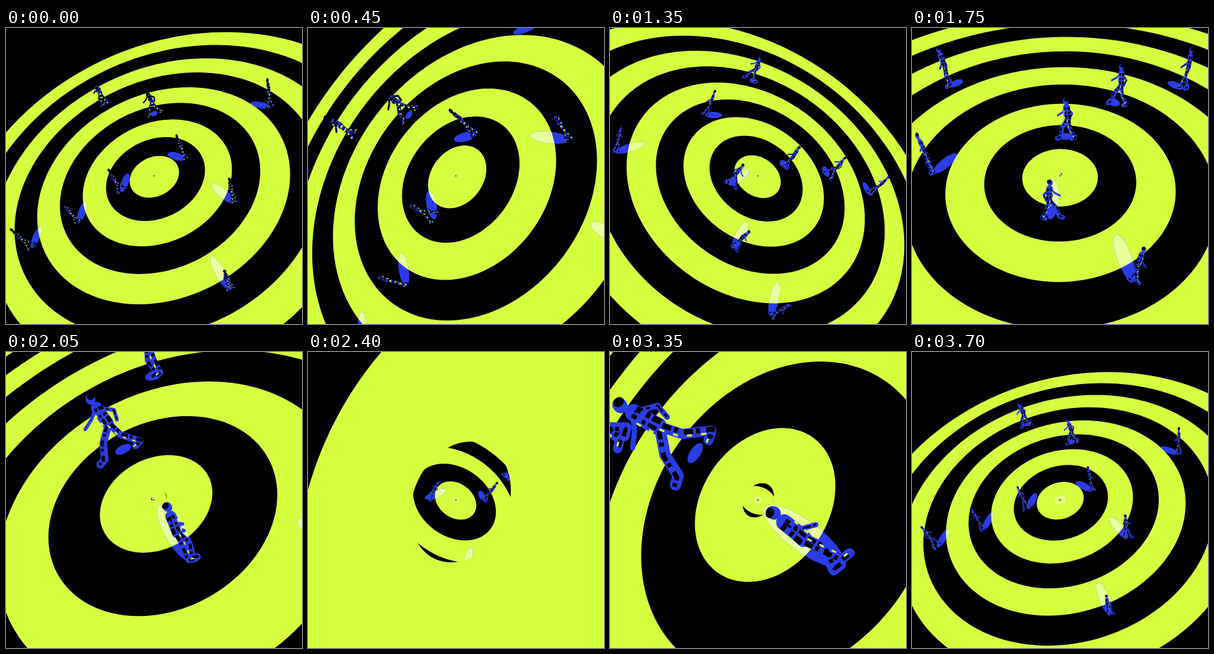
An HTML page with a canvas for the animation above (3.95 s loop, 480 px wide and 480 px high).

```html
<!DOCTYPE html>
<html>
<head>
<meta charset="utf-8">
<title>Walkers on endless rings</title>
<style>
html, body { margin: 0; width: 100%; height: 100%; overflow: hidden; background: #000; }
canvas { display: block; width: 480px; height: 480px; }
</style>
</head>
<body>
<canvas id="stage" width="480" height="480"></canvas>
<script>
const ctx = document.getElementById('stage').getContext('2d');
const YELLOW = '#d6ff40', BLUE = '#2a3ce6', PALE = '#e8ff9c', BLACK = '#000';
const LOOP = 3950, CYCLE = 66.5, REACH = 20.4, SPIN = -5.4;
const FOCUS = 630, TILT = 40.6 * Math.PI / 180;
const C = Math.cos(TILT), S = Math.sin(TILT);
const RINGS = 9, HOLE = 0.225, HEIGHT = 1.5, DEPTH = 4;
const rad = deg => deg * Math.PI / 180;

// start: step at which a layer begins; walk: first angle of each circle of people
const LAYERS = [
  { start: 0, roll: -26, walk: [89, 22.5, -6], dark: true },
  { start: 22.5, roll: 33.3, walk: [28, 46, 56] },
  { start: 44, roll: 20.4, walk: [39, 18.5, 9] }
];
const CIRCLES = [
  { r: 1.4, count: 2, rate: -2.65 },
  { r: 3.4, count: 3, rate: -1.85 },
  { r: 5.4, count: 4, rate: -1.1 }
];

// u runs away from the viewer, v to the right, h up from the plane
function makeView(s) {
  const k = s * S / FOCUS, kh = s * C / FOCUS;
  return {
    k,
    depth: (u, h) => 1 + k * u - kh * h,
    at(u, v, h = 0) {
      const d = this.depth(u, h);
      return [s * v / d, -s * (u * C + h * S) / d];
    }
  };
}

function addLine(points) {
  points.forEach(([x, y], i) => i ? ctx.lineTo(x, y) : ctx.moveTo(x, y));
}

function addCircle(view, r, u = 0, v = 0, ru = r) {
  const nearest = -0.97 / view.k, pts = [];
  for (let i = 0; i < 180; i++) {
    const a = i * Math.PI / 90;
    pts.push(view.at(Math.max(u + ru * Math.cos(a), nearest), v + r * Math.sin(a)));
  }
  addLine(pts);
  ctx.closePath();
}

function fillDisc(view, color, r) {
  ctx.beginPath();
  addCircle(view, r);
  ctx.fillStyle = color;
  ctx.fill();
}

function limb(color, width, points) {
  ctx.strokeStyle = color;
  ctx.lineWidth = width;
  ctx.beginPath();
  addLine(points);
  ctx.stroke();
}

function blob(color, x, y, rx, ry) {
  ctx.fillStyle = color;
  ctx.beginPath();
  ctx.ellipse(x, y, rx, ry, 0.2, 0, 7);
  ctx.fill();
}

function drawBody(w, dark) {
  const base = dark ? BLACK : BLUE, patch = dark ? BLUE : BLACK;
  const front = [[.01, .47], [.1 + .1 * w, .28], [.06 + .24 * w, .06], [.15 + .24 * w, .03]];
  const back = [[-.01, .47], [-.02 - .06 * w, .26], [-.08 - .2 * w, .05], [.01 - .2 * w, .02]];
  const armA = [[.02, .77], [-.12 * w - .05, .62], [.06 - .2 * w, .48]];
  const armB = [[.04, .78], [.12 * w + .06, .66], [.17 + .16 * w, .58]];
  const spine = [[0, .5], [.02, .64], [.03, .77]];
  const shift = (pts, dx) => pts.map(([x, y]) => [x + dx, y]);
  ctx.lineCap = ctx.lineJoin = 'round';
  limb(base, .055, armA);
  limb(base, .1, back);
  limb(base, .11, front);
  limb(base, .17, spine);
  limb(base, .05, armB);
  blob(base, .05, .92, .07, .08);
  blob(BLACK, .03, .95, .055, .045);

  // mottled light and dark
  ctx.lineCap = 'butt';
  ctx.setLineDash([.09, .03, .04, .06]);
  limb(patch, .05, shift(back, -.02));
  limb(patch, .045, shift(front, .02));
  limb(patch, .06, shift(spine, -.05));
  limb(patch, .04, shift(spine, .03));
  limb(patch, .02, armA);
  ctx.setLineDash([.05, .09]);
  limb(YELLOW, dark ? .04 : .02, shift(back, .03));
  limb(YELLOW, dark ? .035 : .02, shift(spine, .075));
  if (dark) limb(YELLOW, .03, shift(front, -.025));
  ctx.setLineDash([]);
}

// Shadow stretches inwards and away from the viewer
function drawShadow(view, p) {
  const du = .75 - .5 * p.u / p.r, dv = -.5 * p.v / p.r;
  const len = Math.hypot(du, dv), pts = [];
  for (let i = 0; i < 24; i++) {
    const a = i * Math.PI / 12;
    const along = .5 - .5 * Math.cos(a);
    const side = .17 * Math.sin(a) / len;
    pts.push(view.at(p.u + du * along - dv * side, p.v + dv * along + du * side));
  }
  const fill = color => {
    ctx.beginPath();
    addLine(pts);
    ctx.fillStyle = color;
    ctx.fill();
  };
  fill(BLUE);
  ctx.save();
  ctx.beginPath();
  addCircle(view, Math.floor(p.r));
  ctx.clip();
  fill(PALE);
  ctx.restore();
}

function drawPerson(view, p, step, dark) {
  const foot = view.at(p.u, p.v), head = view.at(p.u, p.v, HEIGHT);
  const dx = head[0] - foot[0], dy = head[1] - foot[1];
  const turn = -Math.cos(p.a);
  const face = (turn < 0 ? -1 : 1) * Math.max(.6, Math.abs(turn));
  ctx.save();
  ctx.transform(-dy * face, dx * face, dx, dy, foot[0], foot[1]);
  drawBody(Math.cos(step / 5 + p.id * 1.9 - 2.4), dark);
  ctx.restore();
}

function people(layer, step, view) {
  const list = [];
  CIRCLES.forEach((c, n) => {
    for (let i = 0; i < c.count; i++) {
      const a = rad(layer.walk[n] + c.rate * step + i * 360 / c.count);
      list.push({ a, r: c.r, u: c.r * Math.cos(a), v: c.r * Math.sin(a), id: n + i });
    }
  });
  return list.filter(p => view.depth(p.u, HEIGHT) > 0.15).sort((a, b) => b.u - a.u);
}

const layerStep = (frame, index) =>
  frame - LAYERS[index % 3].start - CYCLE * Math.floor(index / 3);

// Each layer covers the next one except for the hole in its middle
function drawLayer(frame, index, depth) {
  if (depth > 1) drawLayer(frame, index + 1, depth - 1);
  const step = layerStep(frame, index), layer = LAYERS[index % 3];
  const view = makeView(850 / (REACH - step));
  ctx.setTransform(1, 0, 0, 1, 240, 240);
  ctx.rotate(rad(layer.roll + SPIN * step));
  for (let n = RINGS + 1; n > 0; n--) {
    ctx.beginPath();
    if (n > RINGS) ctx.rect(-400, -400, 800, 800);
    else addCircle(view, n);
    if (depth > 1) addCircle(view, n > 1 ? 0.6 : HOLE);
    ctx.fillStyle = n % 2 ? YELLOW : BLACK;
    ctx.fill('evenodd');
  }
  if (layer.dark && step < 0) {
    fillDisc(view, PALE, HOLE);
    fillDisc(view, YELLOW, HOLE / 2);
  }
  const crowd = people(layer, step, view);
  crowd.forEach(p => drawShadow(view, p));
  crowd.forEach(p => drawPerson(view, p, step, layer.dark && step >= 0));
}

// Steps of 50 ms, every twelfth one a rest, with longer rests at both ends
function frameAt(ms) {
  const raw = Math.floor((Math.min(3700, Math.max(200, ms)) - 200) / 50);
  return raw - Math.floor(raw / 12);
}

let shown = -1;
function draw(ms) {
  const frame = frameAt(ms % LOOP);
  if (frame === shown) return;
  shown = frame;
  let first = 0;
  while (layerStep(frame, first) > 20) first++;
  drawLayer(frame, first, DEPTH);
  ctx.setTransform(1, 0, 0, 1, 0, 0);
  ctx.fillStyle = BLACK;
  ctx.fillRect(239, 239, 1.7, 1.7);
}

const start = performance.now();
function tick() {
  draw(performance.now() - start);
  requestAnimationFrame(tick);
}
tick();
</script>
</body>
</html>
```
